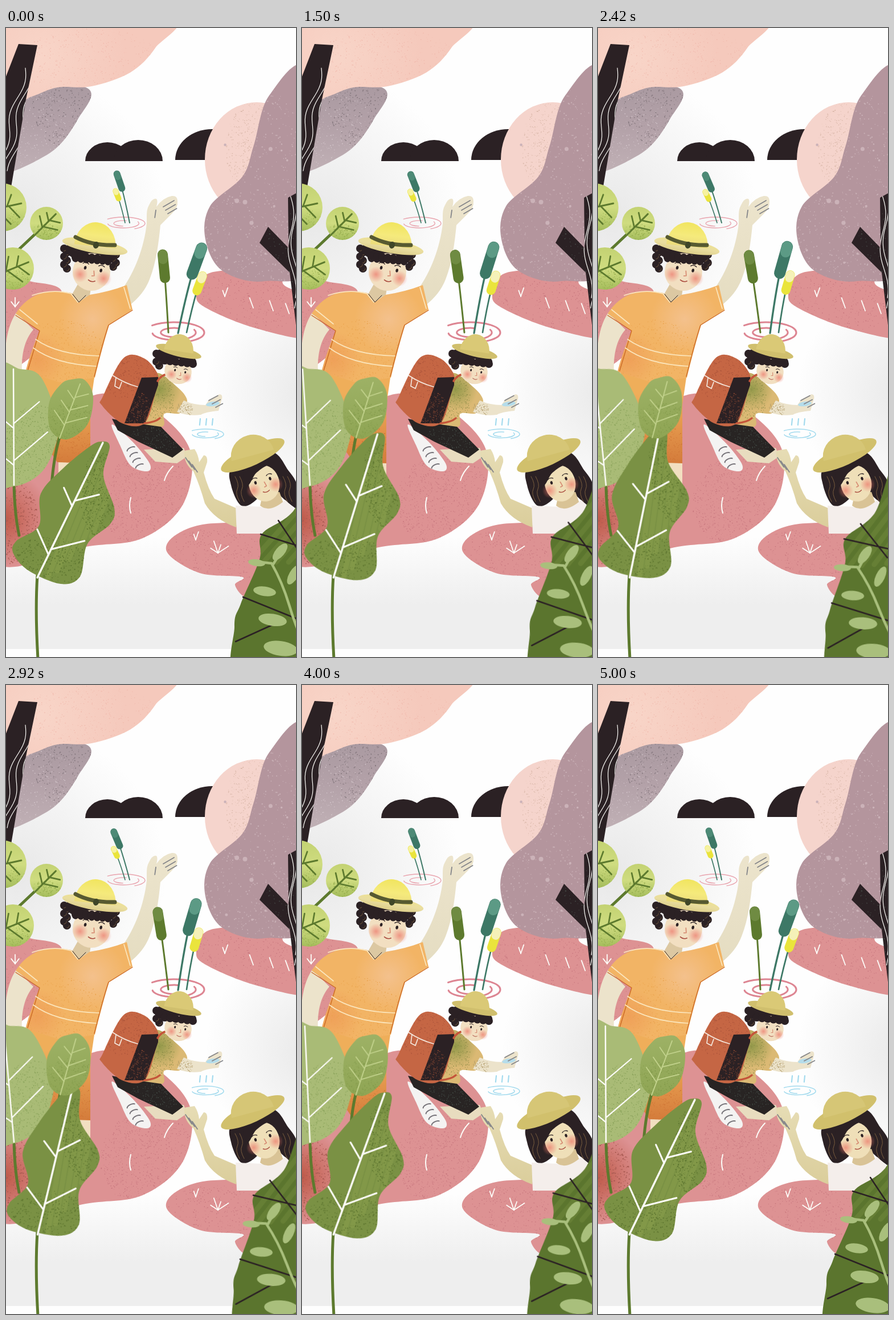
Write an HTML page with a canvas that moves like this. It is 509x1101 px and loops after 5080 ms.

```html
<!DOCTYPE html>
<html lang="en">
<head>
<meta charset="utf-8">
<title>Riverside walk</title>
<style>
html,body{margin:0;width:100%;height:100%;overflow:hidden;background:#fefefe}
canvas{display:block;width:100vw;height:100vh}
</style>
</head>
<body>
<canvas id="stage" width="509" height="1101"></canvas>
<script>
const W = 509, H = 1101, PAD = 100, TAU = Math.PI * 2, RAD = Math.PI / 180;
const INK = '#2b2124', ROCK = '#dd9293', ROCK_DARK = '#c6757d', SKIN = '#ece3cb', FACE = '#f2dfc1';
const WHITE = '#fdfcf8', TEAL = '#3d7866', OLIVE = '#5d7a2e', LEMON = '#eae43c', WATER = '#a4dbee';
const stage = document.getElementById('stage').getContext('2d');
let c = stage;

let seed = 7;
function rnd() {
  seed = (seed + 0x6D2B79F5) | 0;
  let v = Math.imul(seed ^ (seed >>> 15), 1 | seed);
  v = (v + Math.imul(v ^ (v >>> 7), 61 | v)) ^ v;
  return ((v ^ (v >>> 14)) >>> 0) / 4294967296;
}

const range = n => Array.from({length: n}, (_, i) => i);
const poly = text => new Path2D('M' + text.replace(/ /g, 'L') + 'Z');
function oval(x, y, rx, ry = rx, deg = 0, from = 0, to = TAU) {
  const p = new Path2D();
  p.ellipse(x, y, rx, ry, deg * RAD, from, to);
  return p;
}
// Smooth closed curve through points given as "x,y x,y ..."
function blob(text) {
  const p = text.split(' ').map(s => s.split(',').map(Number)), n = p.length;
  const path = new Path2D();
  path.moveTo(...p[0]);
  for (let i = 0; i < n; i++) {
    const [a, b, d, e] = [i - 1, i, i + 1, i + 2].map(k => p[(k + n) % n]);
    path.bezierCurveTo(b[0] + (d[0] - a[0]) / 6, b[1] + (d[1] - a[1]) / 6,
      d[0] - (e[0] - b[0]) / 6, d[1] - (e[1] - b[1]) / 6, ...d);
  }
  return path;
}
function fill(path, color) { c.fillStyle = color; c.fill(path); return path; }
function line(d, color, w = 2) {
  c.strokeStyle = color; c.lineWidth = w; c.lineCap = c.lineJoin = 'round';
  c.stroke(typeof d === 'string' ? new Path2D(d) : d);
}
function ray(x, y, deg, len, color, w) {
  line(`M${x},${y}L${x + len * Math.cos(deg * RAD)},${y + len * Math.sin(deg * RAD)}`, color, w);
}
function fade(y0, y1, ...colors) {
  const g = c.createLinearGradient(0, y0, 0, y1);
  colors.forEach((k, i) => g.addColorStop(i / (colors.length - 1), k));
  return g;
}
function inside(path, draw) { c.save(); c.clip(path); draw(); c.restore(); }
function glow(x, y, r, rgb, a) {
  const g = c.createRadialGradient(x, y, 0, x, y, r);
  g.addColorStop(0, `rgba(${rgb},${a})`);
  g.addColorStop(1, `rgba(${rgb},0)`);
  c.fillStyle = g;
  c.fillRect(x - r, y - r, 2 * r, 2 * r);
}
function grain(path, color, n, x, y, rx, ry = rx, size = 1) {
  inside(path, () => {
    c.fillStyle = color;
    for (let i = 0; i < n; i++) {
      const a = rnd() * TAU, r = Math.sqrt(rnd()), s = size * (.5 + rnd());
      c.fillRect(x + Math.cos(a) * r * rx, y + Math.sin(a) * r * ry, s, s);
    }
  });
}
function turn(x, y, deg, draw) {
  c.save();
  c.translate(x, y); c.rotate(deg * RAD); c.translate(-x, -y);
  draw();
  c.restore();
}
function layer(draw) {
  const el = document.createElement('canvas');
  el.width = W + 2 * PAD; el.height = H + 2 * PAD;
  c = el.getContext('2d');
  c.translate(PAD, PAD);
  draw();
  c = stage;
  return el;
}

// Midrib from base to tip with a pair of side veins at each step
function veins(x0, y0, x1, y1, steps, spread, len, color, w) {
  const deg = Math.atan2(y1 - y0, x1 - x0) / RAD;
  line(`M${x0},${y0}L${x1},${y1}`, color, w);
  for (const t of steps) for (const side of [1, -1]) {
    const s = side > 0 ? t : t - .04;
    ray(x0 + (x1 - x0) * s, y0 + (y1 - y0) * s, deg + side * spread,
      len * (1 - .65 * t) * (side > 0 ? 1 : .8), color, w * .9);
  }
}
function tuft(x, y, n, len) {
  range(n).forEach(i => ray(x, y, -90 + (i - (n - 1) / 2) * 38, len * (.7 + .3 * (i % 2)), WHITE, 1.8));
}
function grooves(x, y, dx, dy, n) {
  range(n).forEach(k => {
    let d = '';
    for (let t = 0; t <= 1; t += .04)
      d += `${d ? 'L' : 'M'}${x + k * 6 + dx * t + 6 * Math.sin(t * 9 + k * 1.4)},${y + k * 18 + dy * t}`;
    line(d, WHITE, 1.2);
  });
}
function rings(x, y, rx, ry, color, w) {
  range(3).forEach(i => {
    const s = 1 - i * .28, from = 3.9 + i * 2;
    line(oval(x, y, rx * s, ry * s, 0, from, from + 3.4), color, w);
  });
}
function fingers(x, y, deg, len, gap) {
  range(3).forEach(i => ray(x + i * gap, y + i * 6, deg, len - i * 2, '#85868a', 1.8));
}
function curls(x, y, n, step, r) {
  range(n).forEach(i => fill(oval(x + (i % 2) * r * .7, y + i * step, r), INK));
  range(n).forEach(i => line(oval(x + (i % 2) * r * .7, y + i * step, r * .6, r * .6, 0, 0, 1.6), '#8d6d46', .7));
}
function face(x, y, s, deg) {
  c.save();
  c.translate(x, y); c.rotate(deg * RAD); c.scale(s, s);
  for (const side of [-1, 1]) {
    fill(oval(side * 14, -5, 2.3, 3.2), INK);
    line(oval(side * 14, -10, 6, 4, 0, 3.7, 5.7), INK, 1.4);
    glow(side * 21, 8, 14, '236,118,104', .7);
  }
  line('M2-2L4,6L0,7', '#d78d74', 1.8);
  line('M-5,15Q1,19 7,15', '#a8483c', 1.5);
  c.restore();
}
function hat(x, y, rx, ry, high, deg, top, brim) {
  turn(x, y, deg, () => fill(oval(x, y, rx, ry), brim));
  turn(x, y, deg * .6, () => fill(oval(x, y, rx * .63, high, 0, Math.PI, TAU), top));
}

function backdrop() {
  c.fillStyle = '#fefefe'; c.fillRect(0, 0, W, H);
  glow(20, 330, 260, '232,232,232', 1);
  glow(540, 640, 190, '232,232,232', 1);
  c.fillStyle = fade(890, 1010, 'rgba(238,238,238,0)', '#eeeeee');
  c.fillRect(0, 890, W, 197);

  const bush = fill(blob('140,104 126,160 72,222 -30,250 -20,100'), fade(100, 245, '#aa9aa1', '#b3a1a8', '#bfafb4'));
  grain(bush, '#85787e', 450, 105, 130, 60, 80, 1.2);
  grain(bush, '#d8cbd0', 400, 50, 190, 80);
  const crown = fill(blob('-20,-20 285,-20 262,35 218,78 150,102 90,104 45,120 -20,140'), '#f5c9bc');
  inside(crown, () => glow(60, 50, 150, '249,216,203', .8));
  grain(crown, '#f0b9ac', 500, 150, 60, 130, 60);
  fill(poly('22,28 55,30 35,125 5,302 -2,302 -2,90'), INK);
  inside(poly('22,28 55,30 35,125 5,302 -2,302 -2,90'), () => grooves(34, 70, -40, 150, 3));

  fill(oval(178, 233, 39, 33, 0, Math.PI, TAU), INK);
  fill(oval(232, 233, 43, 37, 0, Math.PI, TAU), INK);
  fill(oval(362, 231, 65, 54, 0, Math.PI, TAU), INK);
}

function rightBank() {
  const bank = fill(blob('334,468 360,428 480,426 488,450 540,480 540,542 440,526 355,492'), ROCK);
  grain(bank, ROCK_DARK, 420, 420, 480, 100, 55);
  tuft(384, 470, 2, 16);
  [434, 469, 497].forEach((x, i) => ray(x, 490 + i * 5, -110, 19, WHITE, 1.8));
  const pale = fill(oval(440, 230, 91, 100), '#f5d4cc');
  grain(pale, '#d9b7a8', 500, 430, 210, 45, 80);
  const bush = fill(blob('530,80 462,118 435,205 415,260 358,312 350,370 380,425 455,443 540,400'), '#b4959d');
  grain(bush, '#c9b0b6', 900, 440, 290, 110, 190, 1.4);
  range(12).forEach(() => fill(oval(360 + rnd() * 149, 180 + rnd() * 240, 1.5 + rnd() * 2.5), '#cbb2b8'));
  const trunk = fill(poly('460,348 496,385 495,297 515,286 515,570 498,428 445,376'), INK);
  grain(trunk, '#4d5650', 260, 490, 420, 40, 110);
  inside(trunk, () => grooves(498, 290, 6, 190, 2));
}

function leftBank() {
  const bank = fill(blob('-10,447 50,445 98,462 62,520 52,568 -10,593'), ROCK);
  grain(bank, ROCK_DARK, 350, 30, 520, 70, 80);
  tuft(16, 488, 3, 16);
  line('M54,358L20,390', OLIVE, 5);
  for (const [x, y, r, deg] of [[-6, 314, 42, -12], [71, 342, 29, -45], [12, 421, 37, -22]]) {
    const leaf = fill(oval(x, y, r), fade(y - r, y + r, '#c3d272', '#cfdc80', '#a5bd5c'));
    grain(leaf, '#93ab4c', 200, x, y + r * .6, r, r * .6);
    inside(leaf, () => turn(x, y, deg, () => veins(x - r, y, x + r * .8, y, [.4, .7], 58, r * 1.2, OLIVE, 3)));
  }
}

function bigRock() {
  const rock = fill(blob('140,648 205,648 275,680 325,745 310,835 240,893 140,908 -20,935 -20,740'), ROCK);
  grain(rock, ROCK_DARK, 1000, 250, 830, 85);
  inside(rock, () => glow(-5, 860, 85, '190,88,70', 1));
  grain(rock, '#a85a52', 500, 5, 860, 50, 80, 1.4);
  line('M219,822Q215,836 219,849M293,767Q282,778 278,792', WHITE);
}

function man() {
  fill(new Path2D('M18,498C4,520-2,545-3,600H28C27,570 33,545 48,528Z'), SKIN);
  fill(poly('92,745 148,745 148,805 92,805'), FACE);
  const shorts = fill(poly('40,600 156,605 148,660 148,762 90,760 36,680'), fade(640, 765, '#efae5a', '#e2944a', '#d37a3a'));
  grain(shorts, '#cf7536', 300, 115, 740, 40, 50);
  fill(new Path2D('M200,462C222,435 240,392 246,350C249,335 244,322 251,310Q257,297 264,299Q267,302 264,313Q275,297 291,294Q301,293 301,303Q302,315 291,325L271,345C268,375 264,410 252,440Q242,466 216,486Z'), fade(300, 480, '#ece4cc', '#e5ddc2'));
  fingers(276, 313, -30, 22, 4);
  ray(263, 319, 98, 13, '#85868a', 1.8);
  fill(poly('131,440 150,450 146,474 128,482 116,466'), '#dcc8a2');
  const shirt = fill(new Path2D('M60,465Q90,458 115,464L128,480L147,467Q180,462 212,450L222,493L181,520Q170,555 156,612L100,622L34,602Q44,565 59,530L17,500Q33,474 60,465Z'), '#f2b465');
  inside(shirt, () => { glow(152, 510, 60, '244,196,150', .8); glow(55, 580, 50, '238,152,84', .7); });
  grain(shirt, '#e9a24c', 500, 95, 570, 80, 60);
  line('M17,503L59,530L38,600M222,494L180,520Q170,550 155,610', '#cc6a25', 1.4);
  line('M46,468Q82,456 114,465L126,480M207,454L218,491M24,493L55,518M52,545Q90,572 163,574M48,560Q85,588 158,592', '#fbe6bd', 1.7);
  line('M117,466L128,480L140,468', INK, 1);

  curls(102, 386, 6, 7, 7);
  curls(188, 390, 5, 7, 7);
  fill(oval(150, 392, 46, 20, 8), INK);
  fill(oval(150, 427, 33, 33), FACE);
  range(7).forEach(i => fill(oval(122 + i * 9.5, 401 + i * .9, 7, 9), INK));
  face(152, 427, 1, 10);
  const brim = fade(365, 400, '#f0e48a', '#e9dda0', '#d6c67c');
  hat(156, 382, 58, 12, 42, 10, fade(341, 385, '#f1e560', '#f5ea7c', '#ead97c'), brim);
  line('M122,366Q150,381 191,380', '#575a31', 7);
  fill(oval(158, 380, 5, 6, 20), '#3f4628');
}

function boy() {
  fill(poly('242,738 312,735 318,750 300,762 262,759'), '#e8dcbf');
  fill(blob('186,694 222,724 252,762 248,776 219,766 200,730'), '#f4f3f2');
  range(4).forEach(i => line(oval(220 + i * 5, 738 + i * 10, 8, 4, -25, 3.4, 5.8), '#77747a', 2));
  const shirt = fill(blob('262,604 300,628 318,652 306,674 278,675 274,698 222,695 236,650'), '#dbb974');
  inside(shirt, () => glow(270, 632, 38, '140,150,70', .9));
  grain(shirt, '#8d8d48', 300, 268, 645, 28, 40);
  const shorts = fill(poly('186,684 215,690 272,698 311,738 292,752 232,724 196,704'), '#282423');
  grain(shorts, '#46504a', 200, 260, 720, 45, 25);
  fill(new Path2D('M312,652Q330,660 350,660L357,650L375,641Q382,642 378,652L373,670Q350,672 342,677Q320,680 300,672Z'), SKIN);
  grain(poly('300,655 330,660 325,678 300,672'), '#b09a68', 110, 312, 668, 18, 12);
  fill(oval(363, 658, 12, 4, -8), '#b5dcea');
  fingers(356, 652, -28, 18, 6);

  const pack = fill(blob('206,578 242,578 267,608 262,640 243,692 204,692 168,660 170,645'), '#c56644');
  grain(pack, '#a9533a', 350, 215, 610, 50, 40);
  const side = fill(poly('238,612 267,611 267,625 244,692 208,692'), INK);
  grain(side, '#7d4331', 350, 228, 668, 28, 32);
  line('M187,608Q208,622 231,628M193,612L191,627L199,631L203,620', '#f5e9df', 1.7);
  line('M266,618Q272,608 282,606M243,692Q262,690 270,683', '#c4553a', 3.5);

  curls(264, 570, 4, 7, 7);
  fill(oval(297, 578, 38, 15, 12), INK);
  fill(oval(302, 601, 24, 22, 20), FACE);
  range(6).forEach(i => fill(oval(278 + i * 10, 582 + i * 1.2, 7), INK));
  face(305, 604, .66, 12);
  hat(303, 566, 41, 9, 30, 14, '#dac976', '#d0bf6d');
  range(3).forEach(i => ray(341 + i * 11, 684, 96, 11, WATER, 2.2));
  rings(350, 711, 32, 9, WATER, 1.6);
}

function girl() {
  const rock = fill(blob('283,918 300,886 365,867 480,880 480,990 425,998 402,975 415,961 340,954'), ROCK);
  grain(rock, ROCK_DARK, 400, 370, 925, 95, 50);
  tuft(333, 896, 2, 15);
  tuft(372, 919, 4, 22);
  fill(new Path2D('M313,747Q311,739 318,739L331,737Q338,748 339,760L347,748Q354,748 353,760L347,778Q355,808 366,824L410,843L404,874Q365,860 349,832Q340,800 329,776Q314,764 313,747Z'), fade(740, 870, '#e6dcb4', '#dbce9c'));
  fingers(315, 752, 56, 20, 6);
  fill(blob('399,768 395,800 413,836 440,825 460,790 485,822 520,845 512,802 496,775 465,742'), INK);
  fill(poly('450,818 480,812 487,832 460,846 446,836'), '#d9c396');
  fill(new Path2D('M403,836L448,838Q466,848 490,826L515,850V885H405Z'), '#f4eeeb');
  fill(oval(453, 797, 27, 32, -12), '#efdfb8');
  fill(blob('418,775 425,800 440,778 465,766 484,796 484,765 455,745'), INK);
  for (const x of [402, 410, 486, 494]) line(`M${x},785q8,14 4,22t4,22`, '#8d6d46', .8);
  face(452, 797, .95, -16);
  hat(433, 748, 61, 17, 36, -25, '#d6c676', '#d1c06c');
}

function leftLeaf() {
  const leaf = fill(blob('-20,600 25,597 62,612 91,690 84,738 60,780 15,802 -40,790'), '#a9bb76');
  grain(leaf, '#87a058', 700, 55, 735, 60, 75, 1.1);
  veins(14, 800, 13, 597, [.21, .53], 50, 90, WHITE, 2.5);
}
function smallLeaf() {
  const leaf = fill(blob('116,615 138,616 153,645 143,694 107,720 78,703 76,655 97,623'), fade(615, 720, '#9db165', '#8fa554'));
  grain(leaf, '#7f9748', 300, 112, 690, 45, 35);
  veins(94, 718, 130, 623, [.28, .52, .75], 55, 48, '#c2d28c', 2);
}
function oakLeaf() {
  const leaf = fill(blob('166,724 182,732 171,783 190,840 183,868 143,903 130,960 96,973 40,950 13,920 18,898 58,871 61,815 100,771 145,734'), '#7a9144');
  inside(leaf, () => range(5).forEach(i => ray(70 + i * 20, 970 - i * 20, -68, 200, 'rgba(150,170,86,.25)', 9)));
  grain(leaf, '#5f7731', 500, 165, 820, 35, 80, 1.4);
  grain(leaf, '#5f7731', 400, 75, 935, 70, 45, 1.4);
  veins(55, 962, 170, 726, [.21, .57], 50, 70, WHITE, 3.4);
}
function fern() {
  const leaf = fill(blob('570,750 504,846 449,886 445,930 412,1008 401,1048 412,1150 600,1180'), '#5b752e');
  inside(leaf, () => range(5).forEach(i => ray(430 + i * 22, 935, -48, 150, 'rgba(136,156,74,.25)', 9)));
  line('M447,886L540,915M478,862L520,925M416,996L540,1046M403,1074L478,1040', INK, 2.5);
  const pale = '#a9bf7c';
  line('M438,934L466,937Q485,970 497,1010T522,1075M468,940L484,915', pale, 4.5);
  range(4).forEach(i => fill(oval(440 + 14 * i, 936 + 50 * i, 15 + 5 * i, 6 + 2.3 * i, 8), pale));
  range(3).forEach(i => fill(oval(481 + 24 * i, 917 + 40 * i, 18 + i, 8, -50 - 10 * i), pale));
}

// Head leans a little more than its stalk
function cattail([bx, by, x, y, len, w, color, tip]) {
  const lean = 1.4 * (x - bx) / (by - y), dx = lean * len / 2;
  line(`M${bx},${by}Q${bx + (x - bx) * .4},${(by + y) / 2} ${x - dx},${y + len / 2}`, color === LEMON ? TEAL : color, w / 6);
  line(`M${x - dx},${y + len / 2}L${x + dx},${y - len / 2}`, color, w);
  line(`M${x + dx * .6},${y - len * .3}L${x + dx},${y - len / 2}`, tip, w - 1);
}
const reeds = [
  [209, 341, 195, 292, 13, 10, LEMON, '#f6f2a0'],
  [217, 341, 199, 268, 25, 12, TEAL, '#4d8a76'],
  [285, 533, 277, 417, 41, 18, OLIVE, '#6f8b42'],
  [302, 534, 335, 408, 45, 20, TEAL, '#5c9a85'],
  [317, 533, 340, 447, 26, 16, LEMON, '#f5f1b8']
];

const scene = layer(() => {
  [backdrop, rightBank, leftBank, bigRock].forEach(f => f());
  rings(206, 342, 38, 11, '#e9a4ae', 1.4);
  rings(295, 533, 53, 18, '#dd8592', 3);
  [man, boy, girl].forEach(f => f());
  line('M14,798Q15,850 23,888', OLIVE, 5);
});
const [left, small, oak, right] = [leftLeaf, smallLeaf, oakLeaf, fern].map(layer);
const put = el => c.drawImage(el, -PAD, -PAD);

function render(now) {
  const n = Math.floor((now % 5080 + 4) * 12 / 1000);
  const sway = Math.max(0, n <= 30 ? (n - .6) / 29.4 : (60 - n) / 30);
  put(scene);
  reeds.forEach(r => turn(r[0], r[1], -4.4 * sway, () => cattail(r)));
  turn(14, 800, -5.7 * sway, () => put(left));
  turn(86, 705, -6 * sway, () => line('M94,716Q84,750 80,800', OLIVE, 5));
  line('M55,958Q51,1020 56,1104', OLIVE, 5);
  turn(55, 960, -15 * sway, () => put(oak));
  turn(86, 705, -6 * sway, () => put(small));
  turn(540, 1073, -4.9 * sway, () => put(right));
}

const start = performance.now();
function tick() {
  render(performance.now() - start);
  requestAnimationFrame(tick);
}
tick();
</script>
</body>
</html>
```
